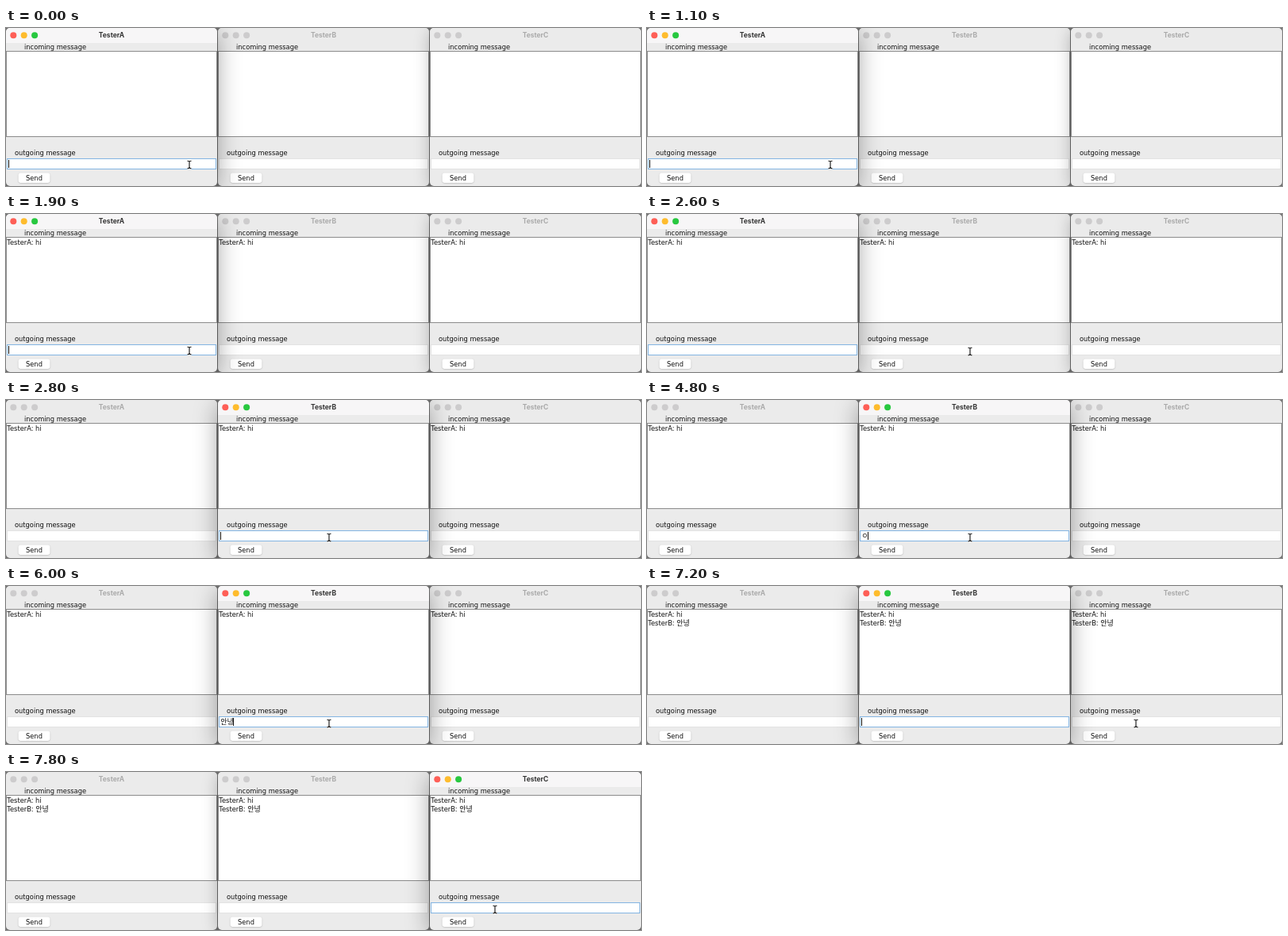
Recreate the animation shown at these times as an HTML page with a canvas. Size 800 by 200 pixels, loop 8 s.

```html
<!DOCTYPE html>
<html lang="en">
<head>
<meta charset="utf-8">
<title>Three chat windows</title>
<style>
  html, body { margin: 0; width: 100%; height: 100%; overflow: hidden; background: #777; }
  canvas { display: block; }
</style>
</head>
<body>
<canvas id="stage" width="800" height="200"></canvas>
<script>
const ctx = document.getElementById('stage').getContext('2d');
const LOOP = 8000, STEP = 100, BLINK = 500;
const PITCH = 267, WIDTH = 266;
const UI_FONT = '8.3px "DejaVu Sans", sans-serif';
const HANGUL_FONT = '9px "Noto Sans CJK KR", "Noto Sans CJK", sans-serif';
const TITLE_FONT = 'bold 8.5px Inter, Roboto, sans-serif';
const NAMES = ['TesterA', 'TesterB', 'TesterC'];

// [time, focused window, text in its field]; each entry restarts the caret blink
const INPUT = [
  [-200, 0, ''], [1300, 0, 'h'], [1400, 0, 'hi'], [1900, 0, ''],
  [2800, 1, ''], [3400, 1, 'd'], [3700, 1, 'dk'], [3800, 1, 'dks'],
  [3900, 1, 'dkss'], [4000, 1, 'dkssu'], [4600, 1, 'dk'], [4800, 1, 'ㅇ'],
  [5000, 1, '아'], [5200, 1, '안'], [5500, 1, '안ㄴ'], [5600, 1, '안녀'],
  [5700, 1, '안녕'], [6100, 1, ''], [7300, 2, '']
];
const MESSAGES = [[1900, NAMES[0] + ': hi'], [6100, NAMES[1] + ': 안녕']];

// [time, x, y] of the mouse pointer
const POINTER = [
  [0, 231, 173], [2300, 250, 172], [2400, 305, 169], [2500, 380, 175], [2600, 407, 174],
  [6600, 430, 178], [6700, 482, 185], [6900, 560, 184], [7000, 608, 176], [7100, 616, 174]
];
// Back-to-front window order for each focused window
const STACKING = [[1, 2, 0], [2, 0, 1], [0, 1, 2]];

const latest = (list, t) => list.filter(entry => entry[0] <= t).pop();

function box(x, y, w, h, r, fill) {
  ctx.beginPath();
  ctx.roundRect(x, y, w, h, r);
  ctx.fillStyle = fill;
  ctx.fill();
}

function shadow(color, blur = 0, dy = 0) {
  ctx.shadowColor = color;
  ctx.shadowBlur = blur;
  ctx.shadowOffsetY = dy;
}

function outline(x, y, w, h, color) {
  ctx.strokeStyle = color;
  ctx.lineWidth = 1;
  ctx.strokeRect(x, y, w, h);
}

// Draws mixed Latin and Hangul text; returns the x where it ends
function label(text, x, y) {
  ctx.fillStyle = '#111';
  ctx.textAlign = 'left';
  for (const run of text.split(/([ㄱ-힣]+)/)) {
    ctx.font = /[ㄱ-힣]/.test(run) ? HANGUL_FONT : UI_FONT;
    ctx.fillText(run, x, y);
    x += ctx.measureText(run).width;
  }
  return x;
}

function drawWindow(index, t, input) {
  const [since, focused, text] = input;
  const active = index === focused;
  const x = index * PITCH;

  shadow(active ? 'rgba(0,0,0,.36)' : 'rgba(0,0,0,.25)', active ? 30 : 20, active ? 6 : 3);
  box(x, 0, WIDTH, 200, 5, '#ebebeb');
  shadow('transparent');

  box(x, 0, WIDTH, 19, [5, 5, 0, 0], active ? '#f7f6f7' : '#ebebeb');
  const lights = active ? ['#fe5f57', '#febc2e', '#28c840'] : Array(3).fill('#cdcccd');
  lights.forEach((color, i) => box(x + 5.3 + i * 13.4, 5.2, 8, 8, 4, color));
  ctx.font = TITLE_FONT;
  ctx.textAlign = 'center';
  ctx.fillStyle = active ? '#333' : '#aaa';
  ctx.fillText(NAMES[index], x + 133, 12.2);

  label('incoming message', x + 23, 27);
  box(x, 29, WIDTH, 109, 0, '#fff');
  outline(x + .5, 29.5, WIDTH - 1, 108, '#8b8b8b');
  MESSAGES.forEach(([time, message], row) => {
    if (t >= time) label(message, x + 1.3, 39 + row * 11);
  });

  label('outgoing message', x + 11, 161);
  box(x + 2, 166, 263, 12, 0, '#fff');
  outline(x + 1.5, 165.5, 263, 13, active ? '#82b4e2' : '#e2e2e2');
  if (active) {
    const end = label(text, x + 3.3, 175);
    const caretOn = Math.floor((t - since) / BLINK) % 2 === 0;
    if (caretOn) box(Math.floor(end), 167, 1, 10, 0, '#111');
  }

  shadow('rgba(0,0,0,.25)', 1.5, .5);
  box(x + 15.5, 183.5, 40, 12.5, 3, '#fff');
  shadow('transparent');
  label('Send', x + 25, 193);
}

function strokePath(path, color, width) {
  ctx.strokeStyle = color;
  ctx.lineWidth = width;
  ctx.stroke(path);
}

function drawPointer(x, y) {
  ctx.save();
  ctx.translate(x, y);
  if (y > 180) {
    const arrow = new Path2D('M0 0V9L2 7.2L3.4 10.5L4.9 9.9L3.5 6.6H6.4Z');
    strokePath(arrow, '#fff', 1.2);
    ctx.fillStyle = '#000';
    ctx.fill(arrow);
  } else {
    const beam = new Path2D('M-2.5 -4.8Q0 -4.8 0 -3V3Q0 4.8 -2.5 4.8M2.5 -4.8Q0 -4.8 0 -3M0 3Q0 4.8 2.5 4.8');
    strokePath(beam, '#fff', 2.2);
    strokePath(beam, '#111', 1.1);
  }
  ctx.restore();
}

function render(now) {
  const t = Math.floor(now % LOOP / STEP) * STEP;
  const input = latest(INPUT, t);
  box(0, 0, 800, 200, 0, '#777');
  STACKING[input[1]].forEach(index => drawWindow(index, t, input));
  const [, x, y] = latest(POINTER, t);
  drawPointer(x, y);
}

let start;
function tick(now) {
  start ??= now;
  render(now - start);
  requestAnimationFrame(tick);
}
requestAnimationFrame(tick);
</script>
</body>
</html>
```
